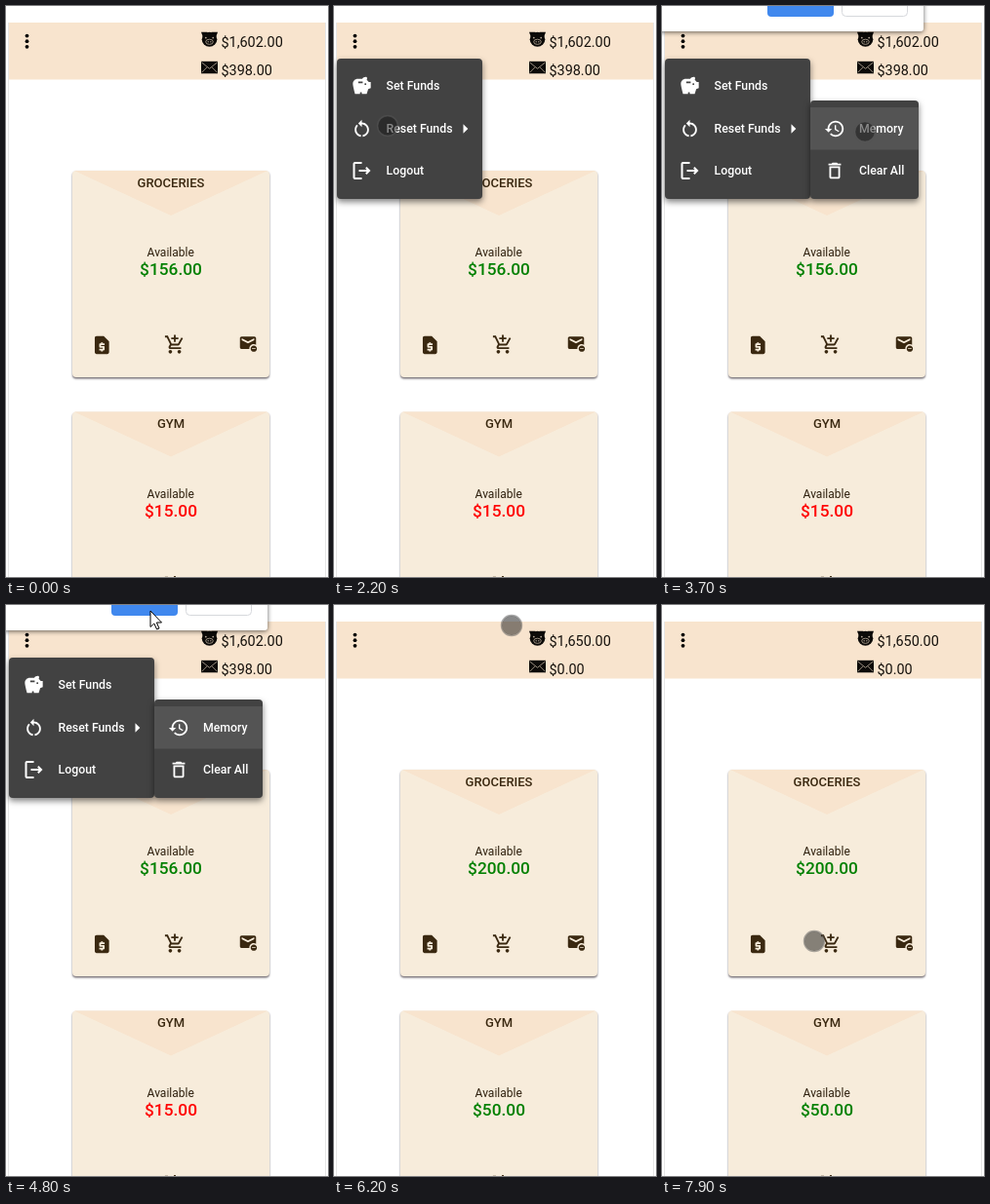
Recreate the animation shown at these times as an HTML page with a canvas. Size 330 by 586 pixels, loop 8000 ms.

```html
<!DOCTYPE html>
<html lang="en">
<head>
<meta charset="utf-8">
<title>Envelope budget</title>
<style>
  html, body { margin: 0; width: 100%; height: 100%; overflow: hidden; background: #fff; }
  canvas { display: block; width: 330px; height: 586px; }
</style>
</head>
<body>
<canvas id="stage"></canvas>
<script>
const W = 330, H = 586, LOOP = 8000, STEP = 100;
const canvas = document.getElementById('stage');
const c = canvas.getContext('2d');
const dpr = window.devicePixelRatio || 1;
canvas.width = W * dpr;
canvas.height = H * dpr;

const BEIGE = '#f8e4ce', CARD = '#f7ecdb', INK = '#3a2810', MENU = '#424242';

// Icons on a 24 unit grid
const icons = {
  quote: 'M14 2H6C4.9 2 4 2.9 4 4V20c0 1.1.9 2 2 2H18c1.1 0 2-.9 2-2V8zM15 12h-4v1h3c.55 0 1 .45 1 1v3c0 .55-.45 1-1 1h-1v1h-2v-1H9v-2h4v-1h-3c-.55 0-1-.45-1-1v-3c0-.55.45-1 1-1h1V9h2v1h2z',
  cart: 'M11 9h2V6h3V4h-3V1h-2v3H8v2h3v3zm-4 9c-1.1 0-2 .9-2 2s.9 2 2 2 2-.9 2-2-.9-2-2-2zm10 0c-1.1 0-2 .9-2 2s.9 2 2 2 2-.9 2-2-.9-2-2-2zm-9.83-3.25l.03-.12.9-1.63h7.45c.75 0 1.41-.41 1.75-1.03l3.86-7.01L19.42 4h-.01l-1.1 2-2.76 5H8.53l-.13-.27L6.16 6l-.95-2-.94-2H1v2h2l3.6 7.59-1.35 2.45c-.16.28-.25.61-.25.96 0 1.1.9 2 2 2h12v-2H7.42c-.13 0-.25-.11-.25-.25z',
  mail: 'M18.5 13c-1.93 0-3.5 1.57-3.5 3.5s1.57 3.5 3.5 3.5 3.5-1.57 3.5-3.5-1.57-3.5-3.5-3.5zm2 4h-4v-1h4v1zm-6.95 0c-.02-.17-.05-.33-.05-.5 0-2.76 2.24-5 5-5 .92 0 1.76.26 2.5.69V5c0-1.1-.9-2-2-2H5c-1.1 0-2 .9-2 2v10c0 1.1.9 2 2 2h8.55zM12 10.5L5 7V5l7 3.5L19 5v2z',
  savings: 'M19.83 7.5l-2.27-2.27c.07-.42.18-.81.32-1.15.08-.18.12-.37.12-.58 0-.83-.67-1.5-1.5-1.5-1.64 0-3.09.79-4 2h-5C4.46 4 2 6.46 2 9.5S4.5 21 4.5 21H10v-2h2v2h5.5l1.68-5.59L22 14.47V7.5zM13 9H8V7h5v2zm3 2c-.55 0-1-.45-1-1s.45-1 1-1 1 .45 1 1-.45 1-1 1z',
  reset: 'M12 5V2L8 6l4 4V7c3.31 0 6 2.69 6 6 0 2.97-2.17 5.43-5 5.91v2.02c3.95-.49 7-3.85 7-7.93 0-4.42-3.58-8-8-8zM6 13c0-1.65.67-3.15 1.76-4.24L6.34 7.34C4.9 8.79 4 10.79 4 13c0 4.08 3.05 7.44 7 7.93v-2.02c-2.83-.48-5-2.94-5-5.91z',
  logout: 'M17 8l-1.41 1.41L17.17 11H9v2h8.17l-1.58 1.58L17 16l4-4zM5 5h7V3H5c-1.1 0-2 .9-2 2v14c0 1.1.9 2 2 2h7v-2H5z',
  history: 'M13 3c-4.97 0-9 4.03-9 9H1l3.89 3.89.07.14L9 12H6c0-3.87 3.13-7 7-7s7 3.13 7 7-3.13 7-7 7c-1.93 0-3.68-.79-4.94-2.06l-1.42 1.42C8.27 19.99 10.51 21 13 21c4.97 0 9-4.03 9-9s-4.03-9-9-9zm-1 5v5l4.28 2.54.72-1.21-3.5-2.08V8z',
  trash: 'M16 9v10H8V9h8zM14.5 3h-5l-1 1H5v2h14V4h-3.5zM18 7H6v12c0 1.1.9 2 2 2h8c1.1 0 2-.9 2-2z'
};
for (const k in icons) icons[k] = new Path2D(icons[k]);

function icon(name, x, y, size, color) {
  c.save();
  c.translate(x, y);
  c.scale(size / 24, size / 24);
  c.fillStyle = color;
  c.fill(icons[name], 'evenodd');
  c.restore();
}

function text(str, x, y, size, weight, color, align = 'left') {
  c.font = `${weight} ${size}px Roboto, sans-serif`;
  c.textAlign = align;
  c.fillStyle = color;
  c.fillText(str, x, y);
}

function poly(color, ...pts) {
  c.beginPath();
  for (let i = 0; i < pts.length; i += 2) c.lineTo(pts[i], pts[i + 1]);
  c.closePath();
  c.fillStyle = color;
  c.fill();
}

function disc(x, y, r, color) {
  c.beginPath();
  c.arc(x, y, r, 0, 7);
  c.fillStyle = color;
  c.fill();
}

function box(x, y, w, h, r, color, blur = 0, drop = 0, shade = 'rgba(0,0,0,.5)') {
  c.save();
  if (blur) {
    c.shadowColor = shade;
    c.shadowBlur = blur * dpr;
    c.shadowOffsetY = drop * dpr;
  }
  c.beginPath();
  c.roundRect(x, y, w, h, r);
  c.fillStyle = color;
  c.fill();
  c.restore();
}

// Position along keys of [time, x, y]
function along(keys, t) {
  let i = 0;
  while (i < keys.length - 1 && keys[i + 1][0] <= t) i++;
  const a = keys[i], b = keys[i + 1] || a;
  const p = b === a ? 0 : Math.max(0, (t - a[0]) / (b[0] - a[0]));
  return [a[1] + (b[1] - a[1]) * p, a[2] + (b[2] - a[2]) * p];
}

function pig(x, y) {
  poly('#0c0a08', x - 8.5, y - 7, x - 2, y - 7, x - 6, y);
  poly('#0c0a08', x + 8.5, y - 7, x + 2, y - 7, x + 6, y);
  c.beginPath();
  c.ellipse(x, y + .5, 7.8, 7.5, 0, 0, 7);
  c.fillStyle = '#0c0a08';
  c.fill();
  disc(x - 3.7, y - 1.2, .9, '#b5a797');
  disc(x + 3.7, y - 1.2, .9, '#b5a797');
  c.beginPath();
  c.ellipse(x, y + 3, 3.8, 2.6, 0, 0, 7);
  c.strokeStyle = '#a89b8c';
  c.lineWidth = .9;
  c.stroke();
  disc(x - 1.3, y + 3, .7, '#a89b8c');
  disc(x + 1.3, y + 3, .7, '#a89b8c');
}

function envelope(x, y) {
  c.fillStyle = '#0c0a08';
  c.fillRect(x, y, 17, 12.5);
  c.strokeStyle = '#a89b8c';
  c.lineWidth = .9;
  c.beginPath();
  c.moveTo(x + .5, y + 1);
  c.lineTo(x + 8.5, y + 7.5);
  c.lineTo(x + 16.5, y + 1);
  c.moveTo(x + .5, y + 11.5);
  c.lineTo(x + 6, y + 6);
  c.moveTo(x + 16.5, y + 11.5);
  c.lineTo(x + 11, y + 6);
  c.stroke();
}

function card(y, title, amount, color) {
  box(68, y, 202, 212, 4, CARD, 2, 1.5, 'rgba(40,30,40,.65)');
  poly(BEIGE, 70, y, 268, y, 169, y + 46);
  text(title, 169, y + 16.5, 13, 500, INK, 'center');
  text('Available', 168.7, y + 88, 12, 400, '#2e200e', 'center');
  text(amount, 169, y + 107.3, 17.3, 500, color, 'center');
  icon('quote', 87.3, y + 168, 22, INK);
  icon('cart', 162, y + 167.5, 22, INK);
  icon('mail', 237, y + 167.5, 22, INK);
}

function page(done) {
  c.fillStyle = '#fff';
  c.fillRect(0, 0, W, H);
  c.fillStyle = '#e6e6e6';
  c.fillRect(2, 17, 1, H);
  c.fillRect(327, 17, 1, H);
  c.fillStyle = BEIGE;
  c.fillRect(3, 17, 324, 58.5);
  for (let i = -1; i < 2; i++) disc(21.5, 36.2 + i * 5.6, 1.9, '#000');
  pig(208.5, 33.8);
  envelope(200, 56.8);
  text(done ? '$1,650.00' : '$1,602.00', 220.5, 42, 14.4, 400, '#15110c');
  text(done ? '$0.00' : '$398.00', 220.5, 71, 14.4, 400, '#15110c');
  card(169, 'GROCERIES', done ? '$200.00' : '$156.00', 'green');
  card(416.5, 'GYM', done ? '$50.00' : '$15.00', done ? 'green' : 'red');
}

function item(name, label, x, y, size = 22) {
  icon(name, x + 25 - size / 2, y - size / 2, size, '#fff');
  text(label, x + 50, y + 4.2, 12.3, 500, '#fff');
}

function mainMenu(t) {
  box(3, 54, 149, 144, 4, MENU, 6, 3);
  if (t >= 2400 && t < 2800) {
    c.fillStyle = '#525252';
    c.fillRect(3, 104, 149, 43.5);
  }
  item('savings', 'Set Funds', 3.5, 82);
  item('reset', 'Reset Funds', 3.5, 126);
  item('logout', 'Logout', 3.5, 169, 24);
  poly('#fff', 132.5, 121.3, 137.3, 126, 132.5, 130.7);
}

function subMenu(t) {
  c.save();
  c.globalAlpha = Math.min(1, (t - 2400) / 200);
  box(152, 97, 111, 101, 4, MENU, 6, 3);
  if (t >= 3300) {
    c.fillStyle = '#545454';
    c.fillRect(152, 104, 111, 43.5);
  }
  item('history', 'Memory', 152, 126);
  item('trash', 'Clear All', 152, 169);
  c.restore();
}

function dialog(t) {
  box(-10, -20, 278, 46, 3, '#fff', 5, 1, 'rgba(0,0,0,.6)');
  box(108, -20, 68, 31, 4, t >= 5200 && t < 5400 ? '#3268c6' : '#4088ee');
  c.beginPath();
  c.roundRect(184.5, -20, 67, 30.5, 4);
  c.strokeStyle = '#d6d8dc';
  c.lineWidth = 1;
  c.stroke();
}

function touch(x, y) {
  disc(x, y, 10, 'rgba(20,20,20,.5)');
  c.beginPath();
  c.arc(x, y, 10.4, 0, 7);
  c.strokeStyle = 'rgba(85,85,85,.5)';
  c.lineWidth = 1.6;
  c.stroke();
}

function arrow(x, y) {
  poly('#fff', x, y, x, y + 16.5, x + 3.8, y + 13, x + 6.6, y + 19, x + 9, y + 18, x + 6.4, y + 12, x + 11.5, y + 12);
  c.strokeStyle = '#000';
  c.lineWidth = 1;
  c.stroke();
}

const touchPath = [
  [200, 150, 3], [600, 23, 38], [1100, 23, 38], [1400, 33, 62], [1500, 33, 62],
  [1800, 52, 110], [2000, 52, 110], [2200, 55, 123], [2900, 55, 123],
  [3000, 156, 130], [3300, 208, 129], [6100, 208, 129], [6200, 182, 21],
  [6600, 250, 46], [7300, 250, 46], [7600, 216, 48], [7700, 216, 48], [7900, 156, 345]
];
const arrowPath = [[4100, 183, 97], [4200, 183, 97], [4800, 148, 6]];

function draw(t) {
  c.setTransform(dpr, 0, 0, dpr, 0, 0);
  const done = t >= 5500;
  page(done);
  if (t >= 800 && t < 1300) disc(21.3, 36.5, 18, 'rgba(0,0,0,.1)');
  if (t >= 900 && !done) mainMenu(t);
  if (t >= 2500 && !done) subMenu(t);
  if (t >= 3700 && !done) dialog(t);

  if (t >= 4100 && t < 6200) arrow(...along(arrowPath, t));
  else if (t >= 200) {
    const [x, y] = along(touchPath, t);
    if (t >= 800 && t < 1200) disc(x, y, 10, 'rgba(20,20,20,.12)');
    touch(x, y);
  }
}

const start = performance.now();
function tick() {
  const t = (performance.now() - start) % LOOP;
  draw(Math.floor(t / STEP) * STEP);
  requestAnimationFrame(tick);
}
tick();
</script>
</body>
</html>
```
